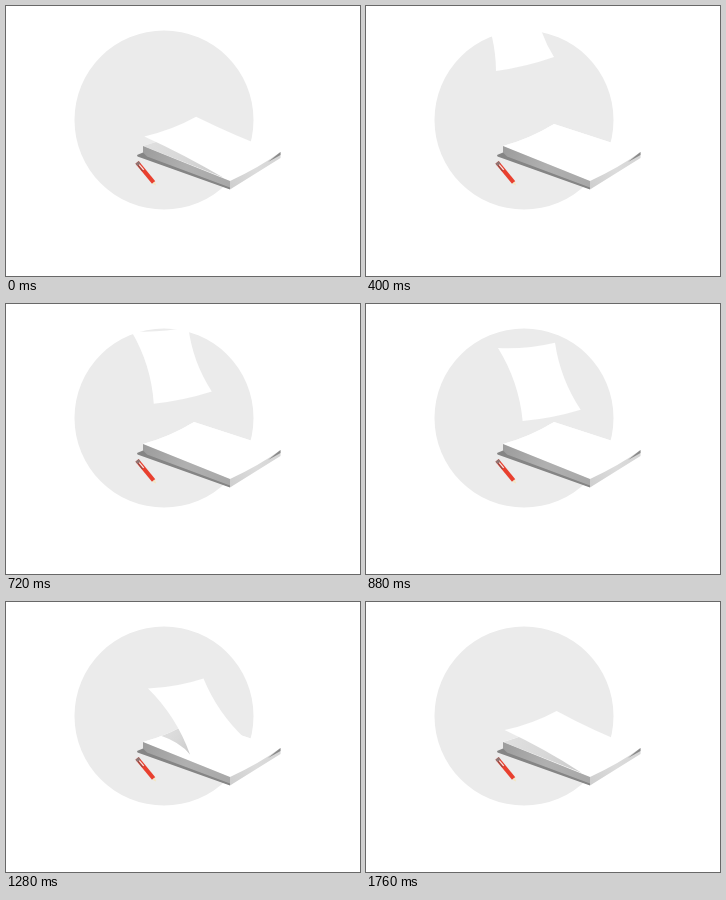
Write an HTML page with a canvas that moves like this. It is 354x270 px and loops after 1.8 s.

```html
<!DOCTYPE html>
<html>
<head>
<meta charset="utf-8">
<style>
html, body { margin: 0; width: 100%; height: 100%; overflow: hidden; background: #fff; }
canvas { display: block; }
</style>
</head>
<body>
<canvas id="stage" width="354" height="270"></canvas>
<script>
const ctx = document.getElementById('stage').getContext('2d');
const LOOP = 1800, STEP = 40;
// The sheet falls evenly, touches the stack, slides forward and settles
const ENTER = 400, TOUCH = 1120, SLIDE = 1440, REST = 2080;

// Corners: top left, top right, bottom right, bottom left
const enter = [[112, -6], [169, -8], [188, 51], [130, 65]];
const touch = [[142, 69], [199, 62], [228, 133], [170, 143]];
const slide = [[142, 104], [196, 91], [250, 140], [198, 162]];
const rest = [[137, 140], [188, 118], [274, 146], [224, 175]];

const clamp = k => Math.max(0, Math.min(1, k));
const mix = (a, b, k) => a.map((p, i) => p.map((v, j) => v + (b[i][j] - v) * k));
const landing = t => 1 - (1 - clamp((t - SLIDE) / (REST - SLIDE))) ** 1.6;

function cornersAt(t) {
  if (t < TOUCH) return mix(enter, touch, (t - ENTER) / (TOUCH - ENTER));
  if (t < SLIDE) return mix(touch, slide, (t - TOUCH) / (SLIDE - TOUCH));
  return mix(slide, rest, landing(t));
}

// Curve whose middle stands off the straight line by bow pixels
function edge(path, [x0, y0], [x1, y1], bow) {
  const dx = x1 - x0, dy = y1 - y0, s = 2 * bow / Math.hypot(dx, dy);
  path.quadraticCurveTo((x0 + x1) / 2 + dy * s, (y0 + y1) / 2 - dx * s, x1, y1);
}

function sheetPath(t) {
  const [tl, tr, br, bl] = cornersAt(t), bend = 1 - landing(t), p = new Path2D();
  p.moveTo(...tl);
  edge(p, tl, tr, -2);
  edge(p, tr, br, -4 * bend);
  edge(p, br, bl, 1.5 * bend);
  edge(p, bl, tl, -4.5 * bend);
  return p;
}

function fill(path, color) {
  ctx.fillStyle = color;
  ctx.fill(typeof path === 'string' ? new Path2D(path) : path);
}

function blend(x0, y0, x1, y1, ...colors) {
  const g = ctx.createLinearGradient(x0, y0, x1, y1);
  colors.forEach((c, i) => g.addColorStop(i / (colors.length - 1), c));
  return g;
}

const stack = sheetPath(REST);

// The shadow spreads from the back of the stack to its left corner
function drawShadow(t) {
  if (t <= TOUCH - 80 || t >= REST) return;
  const k = clamp((t - TOUCH + 80) / 720), [x1, y1] = cornersAt(t)[3];
  const x = 168 - 31 * k ** 0.7, y = 140 - (x - 137) * 0.4;
  const p = new Path2D();
  p.moveTo(x, y);
  p.quadraticCurveTo((x + x1) / 2 + 8 * (1 - k), (y + y1) / 2 - 4 * (1 - k), x1, y1);
  p.lineTo(188, 118);
  p.lineTo(x, y - 8);
  ctx.save();
  ctx.clip(stack);
  fill(p, blend(x, y, x1, y1, '#e0e0e0', '#d8d8d8', '#cacaca'));
  ctx.restore();
}

function drawSheet(t) {
  drawShadow(t);
  fill(sheetPath(t), '#fff');
}

function drawSides() {
  fill('M137 140L224 175V183L137 151Z', blend(137, 140, 224, 180, '#9c9c9c', '#b0b0b0', '#a8a8a8'));
  fill('M131 149L137 146.5L141 150.5L224 181.5V183.5L131.5 150.5Z', '#858585');
  fill('M224 175Q254 161 274.5 146V152Q252 166 224 183.5Z', blend(224, 178, 274, 148, '#cfcfcf', '#dcdcdc', '#d4d4d4'));
  fill('M274.5 146V149L262 156Z', '#8a8a8a');
}

function drawPen() {
  ctx.save();
  ctx.translate(131, 156.5);
  ctx.rotate(0.88);
  fill('M0 -2.2H26V2H0Z', '#e8402f');
  fill('M0 -2.2H3V2H0Z', '#8f7674');
  fill('M3 .4H10V1.6H3Z', '#8f4a44');
  fill('M3 -1H10V.2H3Z', '#f7e6e4');
  fill('M26 -1.6L29.5 -.5V.6L26 1.6Z', '#f3e6c4');
  ctx.restore();
}

function draw(now) {
  const t = Math.floor(now % LOOP / STEP) * STEP;
  fill('M0 0H354V270H0Z', '#fff');
  fill('M68.5 114a89.5 89.5 0 1 0 179 0a89.5 89.5 0 1 0 -179 0Z', '#ebebeb');
  fill(stack, '#fff');
  drawSheet(t + LOOP);
  drawSheet(t);
  drawSides();
  drawPen();
}

const start = performance.now();
function tick() {
  draw(performance.now() - start);
  requestAnimationFrame(tick);
}
tick();
</script>
</body>
</html>
```
